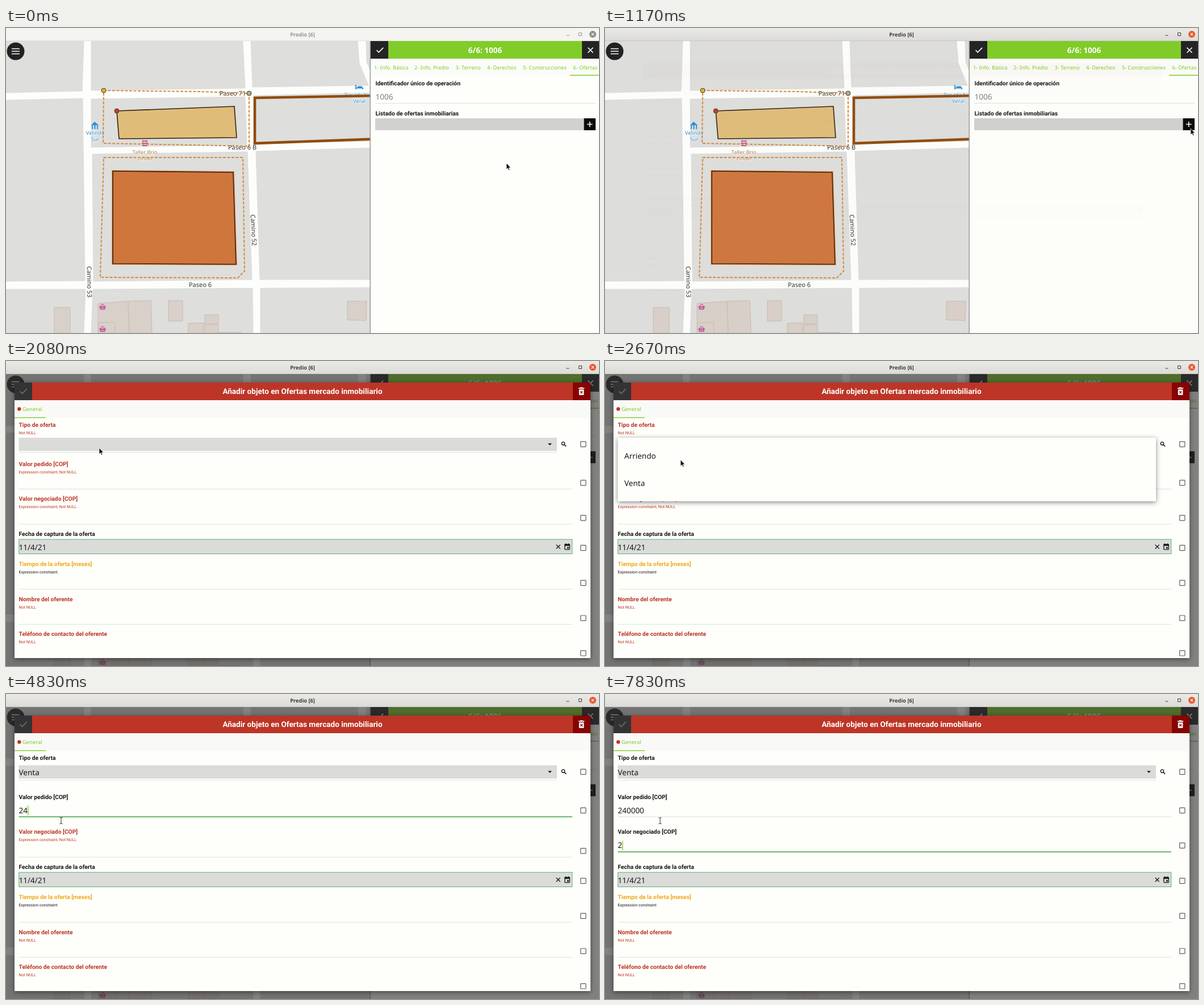
Recreate the animation shown at these times as an HTML page. Size 1044 by 537 pixels, loop 8000 ms.

```html
<!DOCTYPE html>
<html lang="es">
<head>
<meta charset="utf-8">
<title>Predio [6]</title>
<style>
html, body { margin: 0; width: 100%; height: 100%; overflow: hidden; background: #fefffb; }
svg { display: block; width: 100vw; height: 100vh; text-rendering: geometricPrecision; }
.ui { font-family: "Noto Sans", "Open Sans", sans-serif; }
.form { font-family: Roboto, sans-serif; }
.map { font-family: "Noto Sans", sans-serif; text-anchor: middle; paint-order: stroke;
  stroke: #fdfefbcc; stroke-width: 2px; stroke-linejoin: round; }
.raised { filter: drop-shadow(0 2px 4px #0007); }
</style>
</head>
<body>
<svg id="stage" viewBox="0 0 1044 537">
  <g id="app"></g><g id="titleBar"></g><g id="dim"></g><g id="dialog"></g><g id="cursor"></g>
</svg>
<script>
const LOOP = 8000, STEP = 1000 / 12;
const GREEN = '#80cc28', RED = '#bd3526', INK = '#161616', PAPER = '#fefffb', GREY = '#dbdcda';
const FOCUS = '#43a047', RULE = '#d0e5d9', VALUE_SIZE = 13.5;

const clamp = v => Math.max(0, Math.min(1, v));
const easeOut = (p, power) => 1 - (1 - clamp(p)) ** power;
const rect = (x, y, w, h, fill, extra = '') =>
  `<rect x="${x}" y="${y}" width="${w}" height="${h}" fill="${fill}" ${extra}/>`;
const circle = (x, y, r, fill, extra = '') => `<circle cx="${x}" cy="${y}" r="${r}" fill="${fill}" ${extra}/>`;
const poly = (points, fill, extra = '') => `<polygon points="${points}" fill="${fill}" ${extra}/>`;
const stroke = (d, color, width = 1, extra = '') =>
  `<path d="${d}" fill="none" stroke="${color}" stroke-width="${width}" ${extra}/>`;
const text = (x, y, size, fill, content, extra = 'class="ui"') =>
  `<text x="${x}" y="${y}" font-size="${size}" fill="${fill}" ${extra}>${content}</text>`;
const centered = 'text-anchor="middle" font-weight="700"';

function mapLabel(x, y, content, { size = 11, color = '#333', angle = 0 } = {}) {
  return text(x, y, size, color, content, `class="map" transform="rotate(${angle} ${x} ${y})"`);
}

function basket(x, y) {
  return poly(`${x - 6},${y - 2} ${x + 6},${y - 2} ${x + 4},${y + 4} ${x - 4},${y + 4}`, '#c25a9a') +
    stroke(`M${x - 4} ${y - 2}L${x} ${y - 6}L${x + 4} ${y - 2}`, '#c25a9a', 1.2) +
    stroke(`M${x - 2} ${y}v3m2-3v3m2-3v3`, '#eed3e2', .7);
}

function mapView() {
  const blocks = [
    '0,23 137,23 134,111 0,114', '150,23 417,23 421,106 150,110',
    '431,23 619,23 622,62 638,101 434,104', '634,23 642,23 642,76 635,60',
    '0,127 135,124 139,445 0,446', '150,125 421,121 424,206 150,210',
    '152,222 425,218 433,443 154,446', '436,119 642,114 642,199 438,204',
    '440,217 642,211 642,443 447,443', '0,460 140,460 137,537 0,537',
    '153,460 434,458 435,537 150,537', '448,458 642,457 642,537 448,537'];
  const buildings = [
    '85,492 113,492 113,537 85,537', '162,485 215,481 217,537 162,537',
    '215,481 255,480 257,537 217,537', '163,519 191,518 192,537 163,537',
    '286,480 311,480 311,516 286,516', '321,520 348,519 348,537 321,537',
    '350,505 374,505 374,521 350,521', '350,522 374,522 374,537 350,537',
    '374,536 414,536 414,537 374,537', '601,481 635,481 634,515 601,514'];
  const dashed = 'stroke="#d08c40" stroke-width="2" stroke-dasharray="5 2.5"';
  const dark = 'stroke="#35200f" stroke-width="1.6"';
  const node = 'stroke="#4b3a26" stroke-width="1"';
  const blue = '#2b8fd8', brown = '#ad7e4d';
  return rect(0, 23, 642, 514, '#fdfefb') +
    blocks.map(p => poly(p, '#dededc', 'stroke="#d6d6d3" stroke-width=".7"')).join('') +
    buildings.map(p => poly(p, '#d9d0c9', 'stroke="#c9bab0"')).join('') +
    basket(170, 492) + basket(170, 531) +
    mapLabel(399, 119, 'Paseo 71') + mapLabel(416, 214, 'Paseo 6 B') + mapLabel(342, 456, 'Paseo 6') +
    mapLabel(432, 356, 'Camino 52', { angle: 87 }) + mapLabel(143, 447, 'Camino 53', { angle: 89 }) +
    poly('150,171 156,165 163,171', blue) + stroke('M152 171v7m9-7v7', blue, 1.8) +
    circle(156.5, 172, 1.3, blue) + stroke('M156.5 173v5', blue, 2) +
    mapLabel(157, 188, 'Velindo', { size: 9.3, color: blue }) +
    mapLabel(157, 199, 'Sur', { size: 9.3, color: blue }) +
    stroke('M240 199h9M239 203h11M240 207h9', '#c25a9a', 2) + stroke('M241 197v11m7-11v11', '#c25a9a', 1) +
    mapLabel(244.5, 222, 'Taller Brio', { size: 9.3, color: brown }) +
    mapLabel(244.5, 233, 'Lindel', { size: 9.3, color: brown }) +
    stroke('M616 100v8M616 105.5h12v2.5M619 103.5h8', blue, 1.8) +
    mapLabel(622, 121, 'Posada Nim', { size: 9.3, color: blue }) +
    mapLabel(622, 132, 'Veral', { size: 9.3, color: blue }) +
    poly('172,110 340,112 428,115 428,208 171,203', 'none', dashed) +
    poly('172,228 417,228 420,428 408,440 166,439', 'none', dashed) +
    poly('438,123 660,119 660,195 438,203', 'none', 'stroke="#914b0b" stroke-width="4.6"') +
    poly('195,146 402,138 406,193 199,195', '#dfbd79', dark) +
    poly('188,252 400,254 405,416 188,415', '#cf763d', 'stroke="#eda268" stroke-width="4"') +
    poly('188,252 400,254 405,416 188,415', '#cf763d', dark) +
    circle(172, 110, 4, '#e2b02e', node) + circle(195, 146, 4, '#c63a31', node) +
    circle(428, 115, 4, '#b5a98f', node) +
    circle(17, 41, 15.5, '#222') + stroke('M10 36.5h14M10 41h14M10 45.5h14', '#fff', 1.6);
}

function sidePanel() {
  const tabs = [[648, '1- Info. Básica'], [719, '2- Info. Predio'], [791.5, '3- Terreno'],
    [847, '4- Derechos'], [910, '5- Construcciones'], [998.5, '6- Ofertas']];
  const bold = 'class="form" font-weight="700"';
  return rect(640.5, 23, 1.5, 514, '#9b9b99') + rect(642, 23, 402, 514, PAPER) +
    rect(642, 54, 402, 30, '#fbfcf9') +
    rect(642, 23, 31, 31, '#242424') + rect(673, 23, 341, 31, GREEN) + rect(1014, 23, 30, 31, '#242424') +
    stroke('M652.5 39l3.7 3.8 8-8.2', '#fff', 1.6) +
    stroke('M1024.5 34.5l9 9m0-9l-9 9', '#fff', 1.7) +
    text(843.5, 43.5, 13.5, '#fff', '6/6: 1006', `class="ui" ${centered}`) +
    tabs.map(([x, label]) => text(x, 72.5, 9.2, GREEN, label)).join('') +
    rect(993, 82.5, 51, 1.5, GREEN) +
    text(650.5, 101, 10.3, INK, 'Identificador único de operación', bold) +
    text(650.5, 126, VALUE_SIZE, '#7d7d7b', '1006') + rect(650, 132, 388, 1, '#dededb') +
    text(650.5, 153.5, 10.3, INK, 'Listado de ofertas inmobiliarias', bold) +
    rect(650, 159, 367.5, 21, '#d1d1cf') + rect(1017.5, 159, 20.5, 21, '#0b0b0b') +
    stroke('M1023 169.5h9.5m-4.75-4.75v9.5', '#fff', 1.6);
}

function windowTitle(t) {
  const active = t >= 170;
  const ink = active ? '#3d3d3b' : '#969693';
  return `<defs><linearGradient id="chrome" x2="0" y2="1"><stop stop-color="#ebe9e6"/>
    <stop offset="1" stop-color="#dddbd7"/></linearGradient></defs>` +
    rect(0, 0, 1044, 23, active ? 'url(#chrome)' : '#f5f4f1') +
    rect(0, 22.3, 1044, .7, active ? '#c3c0ba' : '#dedcd8') +
    text(522, 15, 9.3, ink, 'Predio [6]', `class="ui" ${centered}`) +
    stroke('M986.5 13h5M1008.5 8.5h5v5h-5z', ink, 1) +
    circle(1033, 11, 6, active ? '#e9552a' : '#8d8c89') +
    stroke('M1030.7 8.7l4.6 4.6m0-4.6l-4.6 4.6', '#fff', 1.1);
}

const checkbox = y => rect(1011.7, y - 4.6, 9.2, 9.2, 'none', 'stroke="#5c5d5b" stroke-width="1.2" rx=".8"');
const note = (y, color, content) => text(22.5, y, 7.08, color, content, 'class="form"');
const heading = (y, color, content) => text(22.5, y, 10.28, color, content, 'class="form" font-weight="700"');

// A labelled text input; an accepted value drops the note and pulls the input up.
function field(y, label, message, { value = '', focused, caret, color = RED, noteColor = color } = {}) {
  const shift = value ? 9.5 : 0;
  const caretX = 23.2 + value.length * VALUE_SIZE * .572;
  return heading(y, value ? INK : color, label) +
    (value ? text(22.5, y + 25, VALUE_SIZE, INK, value) : note(y + 13, noteColor, message)) +
    (caret ? rect(caretX - .5, y + 30 - shift - 8.5, 1.4, 17, GREEN) : '') +
    rect(22.5, y + 40.5 - shift, 974.5, focused ? 1.5 : 1, focused ? FOCUS : RULE) + checkbox(y + 30 - shift);
}

function offerType(t) {
  const chosen = t >= 2920, focused = t >= 2250 && t < 3670;
  const top = chosen ? 125.5 : 135, mid = top + 11.5;
  return heading(116, chosen ? INK : RED, 'Tipo de oferta') +
    (chosen ? '' : note(129, RED, 'Not NULL')) +
    rect(22.5, top, 947.5, 23.5, GREY) +
    (chosen ? text(22.5, 142.5, VALUE_SIZE, INK, 'Venta') : '') +
    poly(`954,${mid - 1.5} 961,${mid - 1.5} 957.5,${mid + 2}`, INK) +
    rect(22.5, top + 25.8, 947.5, 1, focused ? FOCUS : RULE) +
    circle(981, mid - 1.2, 2.7, 'none', `stroke="${INK}" stroke-width="1.3"`) +
    stroke(`M983 ${mid + .8}l3.2 3.2`, INK, 1.6) + checkbox(mid);
}

function captureDate() {
  return heading(307.8, INK, 'Fecha de captura de la oferta') +
    rect(22.8, 314, 974, 25.5, GREY, 'stroke="#58b070" stroke-width="1"') +
    text(22.5, 332.7, VALUE_SIZE, INK, '11/4/21') +
    stroke('M968.7 323.5l7 7m0-7l-7 7', INK, 1.3) +
    rect(983.8, 323, 8.6, 8.8, 'none', `stroke="${INK}" stroke-width="1.3" rx=".8"`) +
    rect(983.5, 322.5, 9, 3, INK) + stroke('M985.7 321v2m4.8-2v2', INK, 1.2) +
    rect(988, 327.5, 2.8, 2.8, INK) + checkbox(329);
}

function typeList(t) {
  const opacity = easeOut((t - 2250) / 150, 3) * (1 - clamp((t - 2840) / 150));
  if (!opacity) return '';
  return `<g class="raised" opacity="${opacity}">${rect(22.5, 135, 947.5, 112, PAPER, 'rx="1"')}</g>` +
    `<g opacity="${opacity}">${text(34, 172, VALUE_SIZE, INK, 'Arriendo')}${text(34, 220, VALUE_SIZE, INK, 'Venta')}</g>`;
}

function dialogView(t) {
  const since = t - 1170;
  if (since < 0) return '';
  const opacity = easeOut(since / 150, 3), scale = .9 + .1 * easeOut(since / 220, 5);
  const typed = [4580, 4830, 5080, 5330, 5670, 5920].filter(key => t >= key).length;
  const asked = {
    value: '240000'.slice(0, typed),
    focused: t >= 3670 && t < 6080,
    caret: t >= 3670 && t < 4250 || t >= 4580 && t < 6080
  };
  const agreed = { value: t >= 7750 ? '2' : '', focused: t >= 6830, caret: t >= 7170 };
  const constraint = 'Expression constraint, Not NULL';
  return `<g opacity="${opacity}" transform="translate(522 280.5) scale(${scale}) translate(-522 -280.5)">` +
    `<g class="raised">${rect(15, 38, 1014, 485, PAPER)}</g>` +
    rect(15, 38, 1014, 31, RED) + rect(15, 38, 31, 31, '#333') + rect(998, 38, 31, 31, '#870404') +
    stroke('M24.5 53.5l4 4 8.5-8.7', '#70706e', 1.6) +
    text(522, 58, 13.55, '#fff', 'Añadir objeto en Ofertas mercado inmobiliario', `class="form" ${centered}`) +
    rect(1008.8, 50, 8.6, 10, '#fff', 'rx="1"') + rect(1008, 47.2, 10.2, 1.7, '#fff') + rect(1011, 46.3, 4.2, 1.5, '#fff') +
    stroke('M1011 53l4.2 4.2m0-4.2l-4.2 4.2', '#870404', 1.2) +
    rect(15, 69, 1014, 31, '#f9faf7') + circle(23.3, 84.5, 3.2, '#c5301f') +
    text(29, 88, 9.4, GREEN, 'General', 'class="ui" font-weight="500"') + rect(15, 99, 55, 1.4, GREEN) +
    offerType(t) +
    (t >= 6080 && t < 7170 ? circle(1016.3, 205, 12, '#f4f6f1') : '') +
    field(184.5, 'Valor pedido [COP]', constraint, asked) +
    field(246.2, 'Valor negociado [COP]', constraint, agreed) +
    captureDate() +
    field(360.8, 'Tiempo de la oferta [meses]', 'Expression constraint', { color: '#efa91b', noteColor: INK }) +
    field(422.6, 'Nombre del oferente', 'Not NULL') +
    field(484.4, 'Teléfono de contacto del oferente', 'Not NULL').replace(/<rect[^>]*height="1"[^>]*>/, '') +
    typeList(t) + '</g>';
}

const dimView = t => rect(0, 23, 1044, 514, '#303030', `opacity="${.6 * clamp((t - 1170) / 150)}"`);

const pointerPath = [[0, 881, 238], [80, 881, 238], [830, 1031, 177], [1500, 1031, 177], [2080, 164, 153],
  [2500, 164, 153], [2830, 105, 193], [3170, 105, 193], [3500, 97, 223], [LOOP + 100, 97, 223]];

function pointerView(t) {
  const i = pointerPath.findIndex(([time]) => time > t);
  const [t0, x0, y0] = pointerPath[i - 1], [t1, x1, y1] = pointerPath[i];
  const p = (t - t0) / (t1 - t0), e = p * p * (3 - 2 * p);
  const shape = t >= 3420
    ? stroke('M-2.5-5.5Q0-5.5 0-4Q0-5.5 2.5-5.5M0-4V4M-2.5 5.5Q0 5.5 0 4Q0 5.5 2.5 5.5', '#444', 1.1)
    : `<path d="M0 0V11L2.5 8.7 4.2 12.5 6 11.7 4.3 8H7.7Z" fill="#111" stroke="#fff" stroke-width=".7"/>`;
  return `<g transform="translate(${x0 + (x1 - x0) * e} ${y0 + (y1 - y0) * e})">${shape}</g>`;
}

const layers = { titleBar: windowTitle, dim: dimView, dialog: dialogView, cursor: pointerView };
const drawn = {};
document.getElementById('app').innerHTML = mapView() + sidePanel();

function render(now) {
  const t = Math.floor((now % LOOP + 4) / STEP) * STEP + 4;
  for (const [id, view] of Object.entries(layers)) {
    const markup = view(t);
    if (drawn[id] !== markup) document.getElementById(id).innerHTML = drawn[id] = markup;
  }
  requestAnimationFrame(() => render(performance.now() - start));
}
const start = performance.now();
render(0);
</script>
</body>
</html>
```
